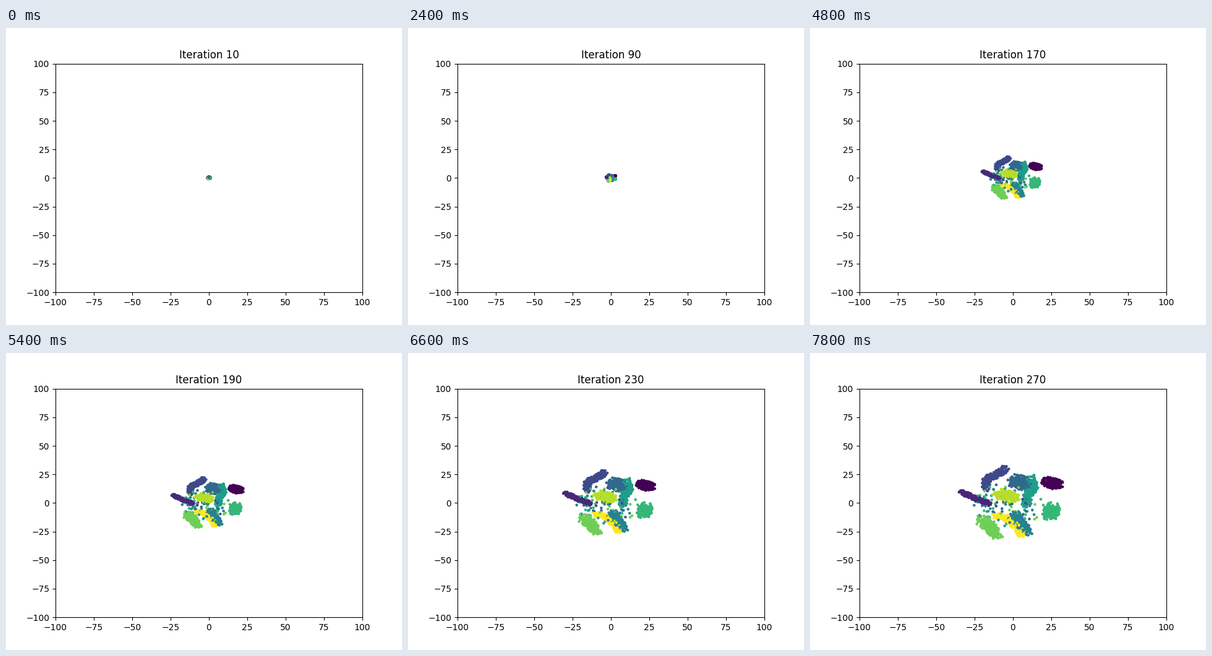
These frames come from a looping animation (640x480 px, 8000 ms). A matplotlib script:

```python
import numpy as np
import matplotlib.pyplot as plt
from matplotlib.animation import FuncAnimation

INTERVAL = 100
FRAMES = 80
FRAMES_PER_STEP = 3
PER_CLUSTER = 210
STRAYS = 110

# One cluster per class: the path it follows when fully spread, and its radius.
CLUSTERS = [
    ([(22.5, 19), (25, 17), (29, 16.5)], 4.1),
    ([(-34, 9.5), (-24, 4), (-16, -.5)], 2.1),
    ([(-18, 12), (-17, 21), (-10, 25), (-5, 30)], 2.9),
    ([(2.5, 20), (7, 16)], 5.3),
    ([(2, -11), (5, -19), (9, -25)], 3.7),
    ([(12, 22), (13, 14), (9, 5), (9, -2)], 3),
    ([(25.3, -4), (24.5, -11)], 5.1),
    ([(-20, -15), (-16, -20), (-10, -28)], 4.3),
    ([(-9, 8), (1, 5)], 4.4),
    ([(-11, -11), (-4, -13), (1, -19), (6, -28)], 2.9),
]

rng = np.random.default_rng(4)


def disc(count):
    angle = rng.uniform(0, 2 * np.pi, count)
    radius = np.sqrt(rng.random(count))
    return np.column_stack([radius * np.cos(angle), radius * np.sin(angle)])


def along_path(path, count):
    path = np.array(path)
    lengths = np.hypot(*np.diff(path, axis=0).T)
    reach = np.concatenate([[0], np.cumsum(lengths)])
    where = rng.uniform(0, reach[-1], count)
    return np.column_stack([np.interp(where, reach, axis) for axis in path.T])


def build_points():
    ends, centres, labels = [], [], []
    for label, (path, radius) in enumerate(CLUSTERS):
        fuzz = 1 + rng.exponential(.08, (PER_CLUSTER, 1))
        cluster = along_path(path, PER_CLUSTER) + radius * fuzz * disc(PER_CLUSTER)
        ends.append(cluster)
        centres.append(np.tile(cluster.mean(axis=0), (PER_CLUSTER, 1)))
        labels.append(np.full(PER_CLUSTER, label))
    strays = disc(STRAYS) * [23, 20] + [-3, -2]
    ends.append(strays)
    centres.append(strays)
    labels.append(rng.integers(2, 8, STRAYS))
    order = rng.permutation(sum(map(len, labels)))
    return [np.concatenate(part)[order] for part in (ends, centres, labels)]


ends, centres, labels = build_points()
noise = rng.normal(size=ends.shape)


def positions(iteration):
    # Tight knots form first; after iteration 100 they open up and drift apart.
    start = min(iteration / 50, 1)
    gather = start * start * (3 - 2 * start)
    left = 1 - max(iteration - 100, 0) / 170
    scale = .11 * gather + .89 * (1 - left ** 1.4)
    spread = scale - .07 * gather * left ** 8
    jitter = .3 * np.exp(-iteration / 40)
    return centres * scale + (ends - centres) * spread + noise * jitter


fig, ax = plt.subplots(figsize=(6.4, 4.8), dpi=100)
ax.set_xlim(-100, 100)
ax.set_ylim(-100, 100)
points = ax.scatter(*positions(10).T, s=5, c=labels, cmap="viridis",
                    vmin=0, vmax=9)
title = ax.set_title("Iteration 10")


def update(frame):
    iteration = 10 + 10 * (frame // FRAMES_PER_STEP)
    points.set_offsets(positions(iteration))
    title.set_text(f"Iteration {iteration}")
    return points, title


anim = FuncAnimation(fig, update, frames=FRAMES, interval=INTERVAL,
                     repeat=True, repeat_delay=0)
plt.show()
```
